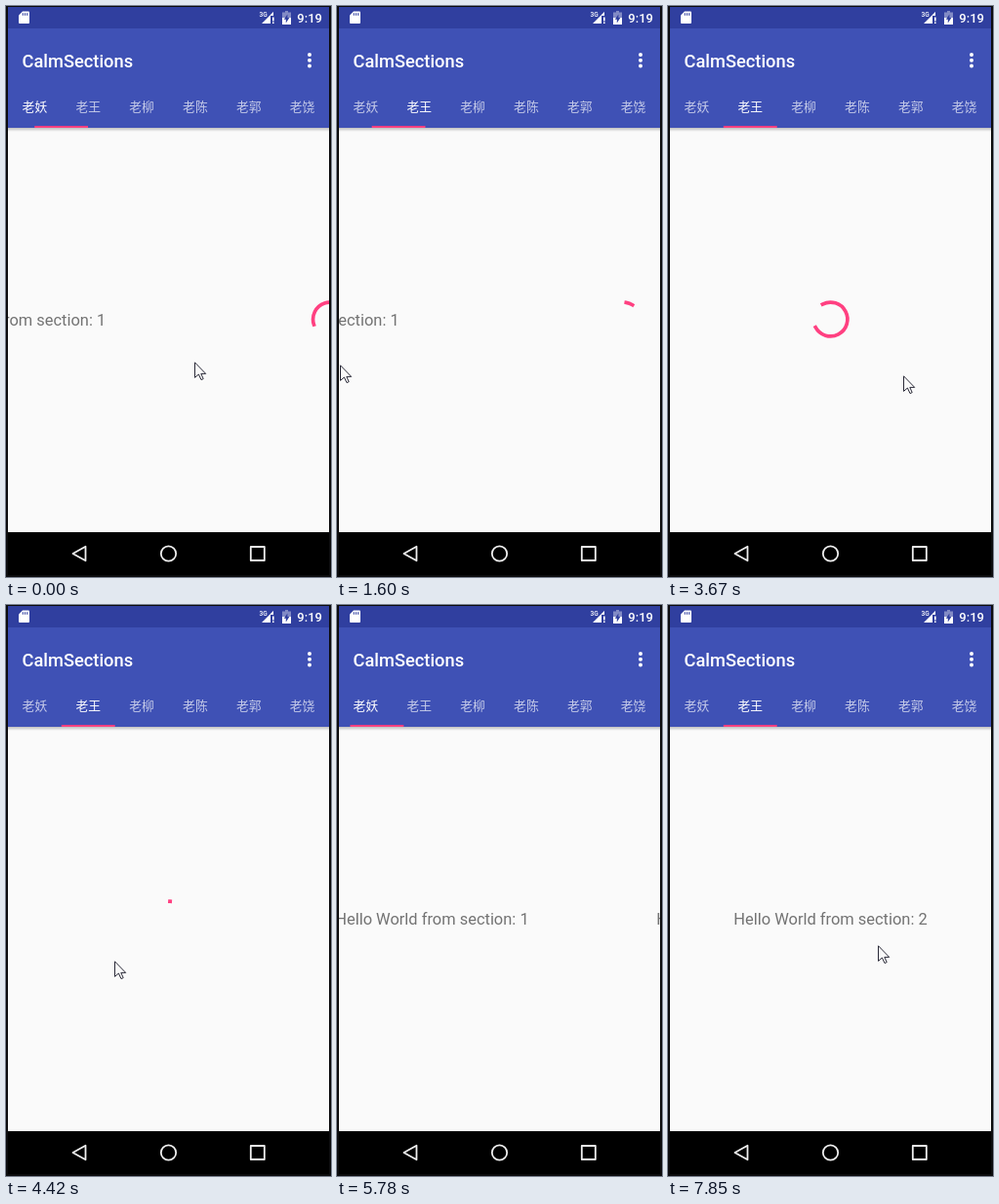
Animation of 333 by 586 pixels, one loop 8000 ms. Source, as an HTML page:

```html
<!DOCTYPE html>
<html lang="en">
<head>
<meta charset="utf-8">
<title>Tabs</title>
<style>
  html, body { margin: 0; width: 100%; height: 100%; overflow: hidden; background: #0c0c0e; }
  svg { display: block; width: 333px; height: 586px; }
  text { font-family: Roboto, "Noto Sans", sans-serif; }
  .tab { font-family: "Noto Sans CJK SC", "Noto Sans CJK", "Noto Sans CJK JP", sans-serif; font-size: 12.8px; text-anchor: middle; fill: #fff; }
  .hello { font-size: 16.45px; text-anchor: middle; fill: #737373; }
</style>
</head>
<body>
<svg viewBox="0 0 333 586">
  <defs>
    <clipPath id="screen"><rect x="2" y="1" width="329" height="583"/></clipPath>
    <linearGradient id="shade" x2="0" y2="1">
      <stop stop-color="#000" stop-opacity=".24"/>
      <stop offset="1" stop-color="#000" stop-opacity="0"/>
    </linearGradient>
  </defs>
  <rect width="333" height="586" fill="#0c0c0e"/>
  <g clip-path="url(#screen)">
    <rect y="125" width="333" height="415" fill="#fafafa"/>
    <g id="pages">
      <text class="hello" x="166.5" y="328">Hello World from section: 1</text>
      <text class="hello" id="loaded" x="495.5" y="328">Hello World from section: 2</text>
      <path id="spinner" fill="none" stroke="#ff4081" stroke-width="3.66" stroke-linecap="square"/>
    </g>
    <rect y="125" width="333" height="4" fill="url(#shade)"/>
    <rect y="23" width="333" height="102" fill="#3f51b5"/>
    <rect y="1" width="333" height="22" fill="#303f9f"/>

    <g fill="#fff">
      <path d="M17 5.5H23Q24 5.5 24 6.5V17Q24 18 23 18H14Q13 18 13 17V9.5Z"/>
      <path d="M17.3 7.2v2.6M19.5 7.2v2.6M21.7 7.2v2.6" stroke="#303f9f" stroke-width="1.1"/>
      <path d="M274 6V10H271V18H262Z"/>
      <path d="M274 6V10H271V9Z" opacity=".4"/>
      <path d="M273 11.5h1.6v4H273zM273 16.5h1.6V18H273z"/>
      <text x="259.5" y="11" font-size="6.6" font-weight="500">3G</text>
      <path d="M286 5h3v1.4h3V12h-9V6.4h3Z" opacity=".4"/>
      <path d="M283 12h9v7h-9Z"/>
      <path d="M288.4 8.5V12h2l-3.6 5.5v-3.8h-2Z" fill="#303f9f"/>
      <text x="298.3" y="17" font-size="13" font-weight="500">9:19</text>
      <text x="16.5" y="63" font-size="18.3" font-weight="500">CalmSections</text>
      <circle cx="311" cy="50" r="2"/>
      <circle cx="311" cy="55.7" r="2"/>
      <circle cx="311" cy="61.4" r="2"/>
    </g>
    <g id="tabs"></g>
    <rect id="indicator" y="123" width="54.8" height="2" fill="#ff4081"/>

    <rect y="540" width="333" height="44" fill="#000"/>
    <g fill="none" stroke="#eee" stroke-width="1.8" stroke-linejoin="round">
      <path d="M68.5 562L81.5 554.7V569.3Z"/>
      <circle cx="166.5" cy="562" r="7.7"/>
      <rect x="250.8" y="555" width="14" height="14"/>
    </g>
    <path id="cursor" d="M.5.8V16.4L4.4 13 7 18.6 9.2 17.6 6.8 12.4H11.7Z" fill="#fafafa" stroke="#2a2a38"/>
  </g>
</svg>
<script>
const LOOP = 8000, REFRESH = LOOP / 60;
const PAGE = 329, TAB = PAGE / 6, LOADED_AT = 4530;
const $ = id => document.getElementById(id);

const smooth = k => k * k * (3 - 2 * k);
const cubic = k => k ** 3;
const ramp = (t, from, to, ease = smooth) => ease(Math.min(1, Math.max(0, (t - from) / (to - from))));

// Drags move the page and the pointer together; settling moves only the page.
function gesture(t) {
  const center = ramp(t, 0, 420);
  const dragLeft = .614 * ramp(t, 850, 1590);
  const goRight = ramp(t, 1640, 2200);
  const wander = ramp(t, 3600, 4300);
  const dragBack = .79 * ramp(t, 4900, 5730, cubic);
  const comeBack = ramp(t, 6090, 6650);
  const dragAgain = .583 * ramp(t, 6790, 7030);
  const finish = ramp(t, 7180, 7730);
  const dragged = dragLeft - dragBack + dragAgain;
  return {
    page: .497 * (1 - center) + dragged + .386 * ramp(t, 1640, 2150)
      - .21 * ramp(t, 6090, 6450) + .417 * ramp(t, 7030, 7500),
    x: 193 + 12 * center - PAGE * dragged + 238 * goRight - 130 * wander - 174 * comeBack + 210 * finish,
    y: 365 + 3 * center + 11 * goRight - 14 * wander - 12 * comeBack - 4 * finish
  };
}

function bezier(x, x0, x1, x2, x3) {
  let lo = 0, hi = 1;
  for (let i = 0; i < 24; i++) {
    const s = (lo + hi) / 2, r = 1 - s;
    const at = x0 * r * r * r + 3 * x1 * s * r * r + 3 * x2 * s * s * r + x3 * s * s * s;
    if (at < x) lo = s; else hi = s;
  }
  return smooth(lo);
}
const trimStart = f => f < .5 ? 0 : .75 * bezier(f, .5, .7, .6, 1);
const trimEnd = f => f > .5 ? .75 : .75 * bezier(f, 0, .2, .1, .5);
const spinCycles = t => .02 - 3.56 * Math.max(0, 1 - t / 4420) ** 1.08;

function arc(cycles) {
  const f = cycles - Math.floor(cycles), base = cycles * 144 + f * 90;
  const from = base + trimStart(f) * 360;
  const to = Math.max(from + .5, base + trimEnd(f) * 360);
  const point = deg => {
    const a = deg * Math.PI / 180;
    return (495.5 + 17.4 * Math.sin(a)).toFixed(2) + " " + (321.5 - 17.4 * Math.cos(a)).toFixed(2);
  };
  return `M${point(from)}A17.4 17.4 0 ${to - from > 180 ? 1 : 0} 1 ${point(to)}`;
}

const tabs = ["老妖", "老王", "老柳", "老陈", "老郭", "老饶"].map((name, i) => {
  const tab = document.createElementNS("http://www.w3.org/2000/svg", "text");
  tab.textContent = name;
  tab.setAttribute("class", "tab");
  tab.setAttribute("x", 2 + TAB * (i + .5));
  tab.setAttribute("y", 107.7);
  $("tabs").append(tab);
  return tab;
});

function draw(time) {
  const { page, x, y } = gesture(Math.floor(time / REFRESH + .001) * REFRESH);
  const loaded = time >= LOADED_AT;
  $("pages").setAttribute("transform", `translate(${-page * PAGE})`);
  $("indicator").setAttribute("x", 2 + page * TAB);
  $("cursor").setAttribute("transform", `translate(${Math.round(x)} ${Math.round(y)})`);
  $("loaded").style.display = loaded ? "" : "none";
  $("spinner").style.display = loaded ? "none" : "";
  $("spinner").setAttribute("d", arc(spinCycles(time)));
  const active = page > .5 ? 1 : 0;
  tabs.forEach((tab, i) => tab.setAttribute("fill-opacity", i === active ? 1 : .7));
}

let start;
function tick(now) {
  start ??= now;
  draw((now - start) % LOOP);
  requestAnimationFrame(tick);
}
draw(0);
requestAnimationFrame(tick);
</script>
</body>
</html>
```
